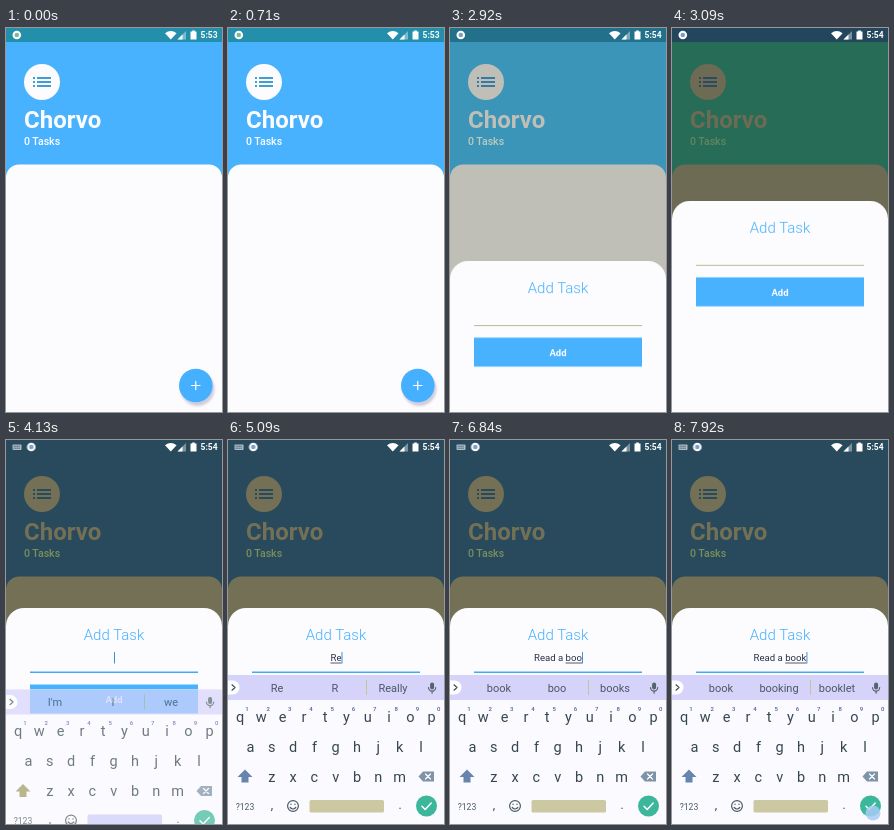
These frames come from a looping animation (216x384 px, 8000 ms). An HTML page:

```html
<!DOCTYPE html>
<html lang="en">
<head>
<meta charset="utf-8">
<title>Task app</title>
<style>
  html, body { margin: 0; width: 100%; height: 100%; overflow: hidden; background: #fcfcff; }
  svg { display: block; width: 100vw; height: 100vh; font-family: Roboto, sans-serif; }
  text { white-space: pre; }
  .mid { text-anchor: middle; }
  .line { fill: none; stroke-width: 1.2; stroke-linecap: round; stroke-linejoin: round; }

  .bar, .head, .panel, .count, .icon, .sheet, .keys, .rule, .dimRule, .tapAdd, .tapDone,
  .iconKeys, .iconRec, .shift, .space { animation: 8s linear infinite; }

  .bar { animation-name: bar; }
  .head { animation-name: head; }
  .panel { animation-name: panel; }
  .count { animation-name: count; }
  .icon { animation-name: icon; }
  @keyframes bar { 0%, 35% { fill: #238fab } 38.6% { fill: #24465c } 41%, 100% { fill: #284a5c } }
  @keyframes head { 0%, 35% { fill: #48b2ff } 38.6% { fill: #266d57 } 41%, 100% { fill: #284a5c } }
  @keyframes panel { 0%, 35% { fill: #fcfcff } 38.6% { fill: #6d6b54 } 41%, 100% { fill: #737055 } }
  @keyframes count { 0%, 35% { fill: #fcfcff } 38.6% { fill: #668560 } 41%, 100% { fill: #7a8f5c } }
  @keyframes icon { 0%, 35% { fill: #3f9fd2 } 38.6% { fill: #2c4a62 } 41%, 100% { fill: #284a5c } }

  .sheet { animation-name: sheet; }
  @keyframes sheet {
    0%, 35% { transform: translateY(216px); animation-timing-function: cubic-bezier(.215, .61, .355, 1); }
    39.8%, 100% { transform: translateY(0); }
  }

  .keys { animation-name: keys; }
  @keyframes keys {
    0%, 49.8% { transform: translateY(62px); opacity: 0; }
    51.6% { transform: translateY(15px); opacity: .7; animation-timing-function: ease-out; }
    53.4%, 100% { transform: translateY(0); opacity: 1; }
  }

  .rule { animation-name: rule; }
  .dimRule { animation-name: dimRule; }
  @keyframes rule { 0%, 46% { opacity: 0 } 48%, 100% { opacity: 1 } }
  @keyframes dimRule { 0%, 46% { opacity: 1 } 48%, 100% { opacity: 0 } }

  .iconKeys { animation-name: iconKeys; animation-timing-function: step-end; }
  .iconRec { animation-name: iconRec; animation-timing-function: step-end; }
  @keyframes iconKeys { 0% { opacity: 0 } 49.8%, 100% { opacity: 1 } }
  @keyframes iconRec { 0% { transform: translateX(0) } 49.8%, 100% { transform: translateX(14.5px) } }

  .shift { animation-name: shift; animation-timing-function: step-end; }
  .space { animation-name: space; animation-timing-function: step-end; }
  @keyframes shift { 0% { fill: #9c9a62 } 58.5%, 100% { fill: #6684ae } }
  @keyframes space { 0% { fill: #d0ccf8 } 55.75%, 100% { fill: #ccc9a2 } }

  .tapAdd { animation-name: tapAdd; animation-timing-function: step-end; }
  .tapDone { animation-name: tapDone; animation-timing-function: step-end; }
  @keyframes tapAdd { 0% { opacity: 0 } 27.625% { opacity: .6 } 30.75%, 100% { opacity: 0 } }
  @keyframes tapDone { 0% { opacity: 0 } 98%, 100% { opacity: .85 } }
</style>
</head>
<body>
<svg viewBox="0 0 216 384" preserveAspectRatio="none">
  <defs>
    <filter id="soft" x="-30%" y="-30%" width="160%" height="160%"><feGaussianBlur stdDeviation=".8"/></filter>
  </defs>

  <!-- home -->
  <rect class="head" width="216" height="384"/>
  <rect class="bar" width="216" height="14"/>
  <circle class="panel" cx="36" cy="54" r="18"/>
  <g class="icon">
    <path d="M31 49h14v2h-14zM31 53h14v2h-14zM31 57h14v2h-14zM27 49h2v2h-2zM27 53h2v2h-2zM27 57h2v2h-2z"/>
  </g>
  <text class="panel" x="18" y="100" font-size="24" font-weight="700">Chorvo</text>
  <text class="count" x="18" y="116.500" font-size="10.600" font-weight="500">0 Tasks</text>
  <path class="panel" d="M0 384V149.500A13 13 0 0 1 13 136.500H203A13 13 0 0 1 216 149.500V384z"/>
  <circle cx="191.500" cy="361" r="17" fill="#cfcddd" filter="url(#soft)"/>
  <circle cx="189.800" cy="357.500" r="16.800" fill="#44b0ff"/>
  <path class="line" stroke="#fff" d="M185.500 357.500h8.500M189.750 353.250v8.500"/>
  <circle class="tapAdd" cx="191" cy="360" r="8" fill="#d6e8ff"/>

  <!-- status icons -->
  <g fill="#fff">
    <g class="iconRec">
      <circle cx="10.800" cy="7" r="4.300"/>
      <circle id="dot" cx="10.800" cy="7" r="2.300" fill="#7fb79a"/>
    </g>
    <g class="iconKeys" fill="#aebcc4">
      <rect x="6.500" y="4.500" width="9" height="5.500" rx=".8"/>
      <path class="line" stroke="#284a5c" style="stroke-width:.7" stroke-dasharray=".7 1" d="M7.800 6.200h6.500M7.800 8.200h6.500"/>
    </g>
    <path d="M159 5.200Q164.800 .8 170.600 5.200L164.800 11.600z"/>
    <path d="M180 3v8.500h-8.500z" opacity=".4"/>
    <path d="M176.500 6.500v5h-5z"/>
    <path d="M184.500 3.500h1.700v-1h2.600v1h1.700v8h-6z"/>
    <text id="clock" x="194.500" y="10.400" font-size="8.500" font-weight="700">5:53</text>
  </g>

  <!-- sheet -->
  <g class="sheet">
    <path d="M0 400V186A18 18 0 0 1 18 168H198A18 18 0 0 1 216 186V400z" fill="#fcfcff"/>
    <text class="mid" x="108" y="200" font-size="15" font-weight="300" fill="#44b0ff">Add Task</text>
    <path class="dimRule" d="M24 232.500h168" stroke="#b5b38a" stroke-width=".9"/>
    <path class="rule" d="M24 232.300h168" stroke="#44a8f5" stroke-width="1.400"/>
    <rect x="24" y="244.500" width="168" height="29" fill="#48b2ff"/>
    <text class="mid" x="108" y="262.500" font-size="9.500" font-weight="700" fill="#fff">Add</text>
    <text id="typed" y="221" font-size="9.600" fill="#2b2f45"></text>
    <path id="under" stroke="#2b2f45" stroke-width=".8"/>
    <rect id="caret" y="212" width="1" height="11.500" fill="#3f8fd8"/>
  </g>

  <!-- keyboard -->
  <g class="keys">
    <rect y="235" width="216" height="165" fill="#fafaff"/>
    <rect y="235" width="216" height="25" fill="#d6d3fb"/>
    <path d="M0 240.500h4.500a7 7 0 0 1 0 14H0z" fill="#fff"/>
    <path class="line" stroke="#3d4c56" d="M4 244.800l3 2.700l-3 2.700"/>
    <path d="M138.500 240v15" stroke="#c6c39a"/>
    <g id="words" class="mid" font-size="11" fill="#4a5768">
      <text x="49" y="252"></text><text x="107" y="252"></text><text x="165" y="252"></text>
    </g>
    <g stroke="#56646e" class="line">
      <rect x="202.700" y="243" width="2.800" height="6" rx="1.400" fill="#56646e"/>
      <path d="M200.500 247.500a3.600 3.600 0 0 0 7.200 0M204.100 251.200v2"/>
    </g>
    <g id="letters" class="mid" font-size="14.500" fill="#37474f"></g>
    <g id="digits" class="mid" font-size="6" font-weight="500" fill="#5a5ca0"></g>
    <path class="shift" d="M17 329.500l7.500 7.500h-4v5.500h-7v-5.500h-4z"/>
    <path d="M190.500 336.500l4.500-5h11v10h-11z" fill="#7e93a8"/>
    <path class="line" stroke="#fff" d="M197.500 334l5 5M202.500 334l-5 5"/>
    <text class="mid" x="17" y="369.500" font-size="8.600" fill="#4a5a64">?123</text>
    <text class="mid" x="44" y="369" font-size="12" fill="#37474f">,</text>
    <text class="mid" x="172" y="369" font-size="12" fill="#37474f">.</text>
    <g stroke="#4a5a64" class="line">
      <circle cx="65" cy="366" r="5.400"/>
      <path d="M62.200 367.500q2.800 3 5.600 0M63 364.200v.3M67 364.200v.3"/>
    </g>
    <rect class="space" x="81.500" y="360" width="74.500" height="12.500" rx="1.500"/>
    <circle cx="198.500" cy="366" r="10.500" fill="#3db79b"/>
    <path class="line" stroke="#fff" style="stroke-width:1.500" d="M194 366.300l3.200 3.200l6-6.500"/>
  </g>
  <circle class="tapDone" cx="201" cy="373" r="7.500" fill="#a9ccf6"/>
</svg>

<script>
const $ = id => document.getElementById(id);
const STEP = 21.3;

function put(parent, x, y, s) {
  const el = document.createElementNS("http://www.w3.org/2000/svg", "text");
  el.setAttribute("x", x);
  el.setAttribute("y", y);
  el.textContent = s;
  parent.append(el);
}

[["qwertyuiop", 12, 282], ["asdfghjkl", 22.5, 311.5], ["zxcvbnm", 43.8, 341.5]].forEach(([row, x, y]) =>
  [...row].forEach((c, i) => put($("letters"), x + i * STEP, y, c)));
[..."1234567890"].forEach((c, i) => put($("digits"), 19 + i * STEP, 270.5, c));

// time, text, suggestions
const typing = [
  [0, "", "I'm I we"],
  [4680, "R", "Re R I"],
  [4960, "Re", "Re R Really"],
  [5260, "Rea", "Really Read Ready"],
  [5440, "Read", "Reading Read Ready"],
  [5600, "Read ", "the it and"],
  [5740, "Read a", "a and at"],
  [5900, "Read a ", "hat thon good"],
  [6220, "Read a b", "book b big"],
  [6460, "Read a bo", "book bo box"],
  [6660, "Read a boo", "book boo books"],
  [6900, "Read a book", "book booking booklet"]
];
const FOCUS = 3700;

const pen = document.createElement("canvas").getContext("2d");
function width(s) {
  pen.font = "96px Roboto, sans-serif";
  return pen.measureText(s).width / 10;
}

function draw(t) {
  const late = t >= 1750;
  $("clock").textContent = late ? "5:54" : "5:53";
  $("dot").setAttribute("fill", late ? "#7d9fc4" : "#7fb79a");

  const [at, text, words] = typing.findLast(s => s[0] <= t);
  const w = width(text), x = 108 - w / 2, end = 108 + w / 2;
  $("typed").setAttribute("x", x);
  $("typed").textContent = text;

  const from = x + width(text.slice(0, text.lastIndexOf(" ") + 1));
  $("under").setAttribute("d", from < end - .1 ? `M${from} 223H${end}` : "");

  const since = t - Math.max(at, FOCUS);
  $("caret").setAttribute("x", end);
  $("caret").setAttribute("opacity", since >= 0 && since % 1000 < 500 ? 1 : 0);

  words.split(" ").forEach((s, i) => $("words").children[i].textContent = s);
}

const clip = document.querySelector(".sheet").getAnimations()[0];
function tick() {
  draw((clip.currentTime || 0) % 8000);
  requestAnimationFrame(tick);
}
draw(0);
requestAnimationFrame(tick);
</script>
</body>
</html>
```
